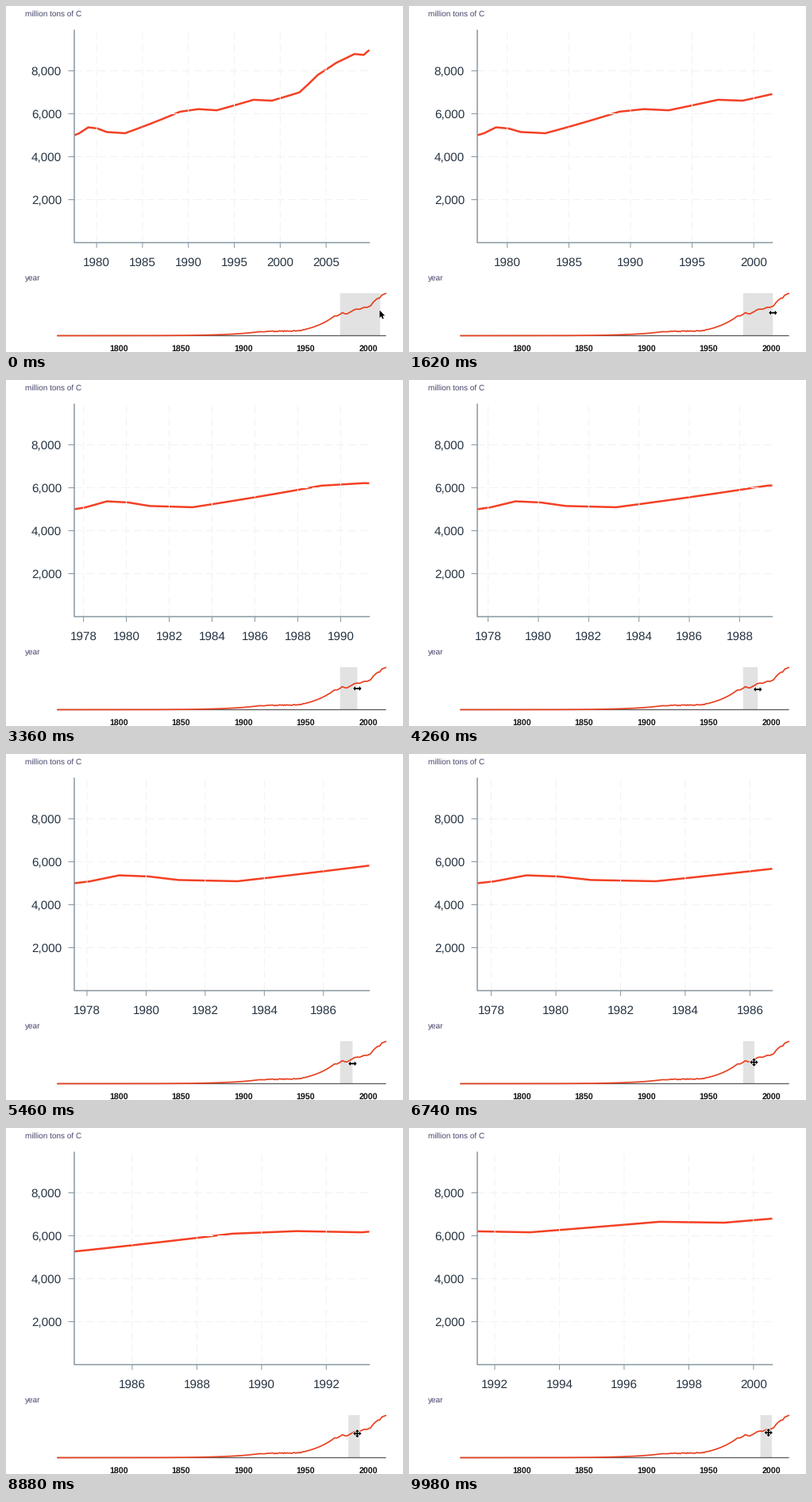
These frames come from a looping animation (500x435 px, 10 s). A matplotlib script:

```python
import numpy as np
import matplotlib.pyplot as plt
from matplotlib.animation import FuncAnimation
from matplotlib.patches import Polygon, Rectangle
from matplotlib.patheffects import withStroke

W, H, DPI = 500, 435, 64
STEP, LOOP = 20, 10000
PT = 72 / DPI  # points per pixel

LEFT, RIGHT, TOP, BASE = 86, 457.5, 30.5, 297.5
RED, AXIS, GRID, INK = "#f44024", "#8797a3", "#f0f2f4", "#263442"
plt.rcParams["text.hinting"] = "none"
plt.rcParams["path.snap"] = False


def emissions():
    """Yearly output: exponential growth between turning points, with unrest midway."""
    turns = [(1751, 3), (1800, 8), (1850, 54), (1875, 188), (1913, 943), (1945, 1180),
             (1973, 4614), (1975, 4610), (1978, 5087), (1979, 5369), (1980, 5316),
             (1981, 5152), (1983, 5094), (1989, 6097), (1991, 6217), (1993, 6162),
             (1997, 6651), (1999, 6610), (2002, 6996), (2004, 7807), (2006, 8370),
             (2008, 8783), (2009, 8740), (2011, 9508), (2014, 9855)]
    when, value = np.array(turns, float).T
    year = np.arange(1751, 2015)
    tons = np.exp(np.interp(year, when, np.log(value)))
    unrest = (year > 1913) & (year < 1950)
    tons += unrest * np.random.default_rng(4).uniform(-110, 90, len(year))
    return year + 0.09, tons


def smooth(keys):
    """Monotone cubic curve through (time, value) keys."""
    t, v = np.array(keys, float).T
    h, slope = np.diff(t), np.diff(v) / np.diff(t)
    m = np.zeros(len(t))
    for i in range(1, len(t) - 1):
        a, b = slope[i - 1], slope[i]
        if a * b > 0:
            w1, w2 = 2 * h[i] + h[i - 1], h[i] + 2 * h[i - 1]
            m[i] = (w1 + w2) / (w1 / a + w2 / b)

    def curve(x):
        i = int(np.clip(np.searchsorted(t, x, "right") - 1, 0, len(h) - 1))
        s = np.clip((x - t[i]) / h[i], 0, 1)
        return ((1 + 2 * s) * (1 - s) ** 2 * v[i] + s * (1 - s) ** 2 * h[i] * m[i]
                + s * s * (3 - 2 * s) * v[i + 1] + s * s * (s - 1) * h[i] * m[i + 1])
    return curve


START = 1977.57
GRAB, MOVE, DRAG = 260, 6600, 7150  # resize starts, pointer changes, pan starts
end_year = smooth([(GRAB, 2009.7), (1620, 2001.5), (2580, 1994.07),
                   (4260, 1989.3), (5460, 1987.55), (6300, 1986.69)])


def pan(t):
    return 13.89 * (max(t - DRAG, 0) / (LOOP - STEP - DRAG)) ** 1.5


def pointer_at(t, edge):
    x = edge + np.interp(t, [6300, 7860, LOOP], [0, -2.2, -4.2])
    y = np.interp(t, [GRAB, 4260, 6300, 7100, LOOP], [384, 389, 389.5, 386, 383])
    return x, y


def main_y(v):
    return BASE - np.asarray(v) * 0.027


def mini_x(year):
    return 142 + (np.asarray(year) - 1800) * 1.57


def mini_y(v):
    return 414.5 - np.asarray(v) * 0.00538


years, tons = emissions()
fig = plt.figure(figsize=(W / DPI, H / DPI), dpi=DPI, facecolor="white")
ax = fig.add_axes([0, 0, 1, 1])
ax.set_xlim(0, W)
ax.set_ylim(H, 0)
ax.axis("off")


def line(x, y, color, width, **kw):
    return ax.plot(x, y, color=color, lw=width * PT, **kw)[0]


def label(x, y, s, size, color, **kw):
    return ax.text(x, y, s, fontsize=size * PT, color=color,
                   family="Liberation Sans", va="baseline", **kw)


def strokes(a, b):
    """Join pairs of ends into one broken path."""
    return np.column_stack([a, b, np.full(len(a), np.nan)]).ravel()


# Overview strip
brush = ax.add_patch(Rectangle((0, 361), 1, 53, fc="#e2e2e2", ec="none"))
line([65, 478], [414.5, 414.5], "#5a5a5a", 1.3)
line(mini_x(years), mini_y(tons), "#e8401f", 1.7)
for y in range(1800, 2001, 50):
    label(mini_x(y), 434, str(y), 10.6, "#111111", ha="center", weight="bold")

# Main chart
curve = line([], [], RED, 2.5, solid_joinstyle="round", solid_capstyle="butt")
dash = dict(dashes=(10, 5), dash_capstyle="butt")
levels = np.arange(2000, 8001, 2000)
level_y = main_y(levels)
n = len(levels)
line(strokes([LEFT] * n, [RIGHT] * n), strokes(level_y, level_y), GRID, 1, **dash)
grid = line([], [], GRID, 1, **dash)
line(strokes([79] * n, [LEFT] * n), strokes(level_y, level_y), AXIS, 1)
ticks = line([], [], AXIS, 1)
line([LEFT, LEFT, RIGHT], [TOP, BASE, BASE], AXIS, 1.5)
for v, y in zip(levels, level_y):
    label(70, y + 5.3, f"{v:,}", 15.2, INK, ha="right")
label(24, 13, "million tons of C", 10, "#45456b")
label(24, 345, "year", 10, "#45456b")
names = [label(0, 326.7, "", 15.2, INK, ha="center") for _ in range(9)]

# Pointer shapes
ARROW = np.array([(0, 0), (0, 9.6), (2.2, 7.6), (3.7, 11), (5.2, 10.3), (3.8, 7), (6.7, 6.8)])
arm = np.array([(0.8, -0.8), (2.4, -0.8), (2.4, -2.5), (5.2, 0), (2.4, 2.5), (2.4, 0.8)])
RESIZE = np.concatenate([arm[1:], -arm[1:]]) * (1, 1.2)
turned = np.column_stack([-arm[:, 1], arm[:, 0]])
FOUR_WAY = np.concatenate([arm, turned, -arm, -turned])
pointer = ax.add_patch(Polygon(ARROW, closed=True, fc="black", ec="none", zorder=6))
pointer.set_path_effects([withStroke(linewidth=1.6 * PT, foreground="white")])


def draw(i):
    t = i * STEP
    shift = pan(t)
    a, b = START + shift, end_year(t) + shift
    scale = (RIGHT - LEFT) / (b - a)

    inside = (years > a) & (years < b)
    xs = np.concatenate([[a], years[inside], [b]])
    curve.set_data(LEFT + (xs - a) * scale, main_y(np.interp(xs, years, tons)))

    gap = 5 if (b - a) / 5 >= 10 ** 0.5 else 2
    marks = np.arange(np.ceil(a / gap) * gap, b, gap)
    mx = LEFT + (marks - a) * scale
    m = len(mx)
    grid.set_data(strokes(mx, mx), strokes([BASE] * m, [TOP] * m))
    ticks.set_data(strokes(mx, mx), strokes([BASE] * m, [BASE + 6] * m))
    for k, text in enumerate(names):
        text.set_visible(k < m)
        if k < m:
            text.set_text(f"{marks[k]:.0f}")
            text.set_x(mx[k])

    brush.set_x(mini_x(a))
    brush.set_width(mini_x(b) - mini_x(a))
    if t < GRAB:
        pointer.set_xy(ARROW + (470.5, 382.5))
    else:
        shape = RESIZE if t < MOVE else FOUR_WAY
        pointer.set_xy(shape + pointer_at(t, mini_x(b)))
    return curve, grid, ticks, brush, pointer, *names


anim = FuncAnimation(fig, draw, frames=LOOP // STEP, interval=STEP,
                     repeat=True, repeat_delay=0, blit=False)
plt.show()
```
